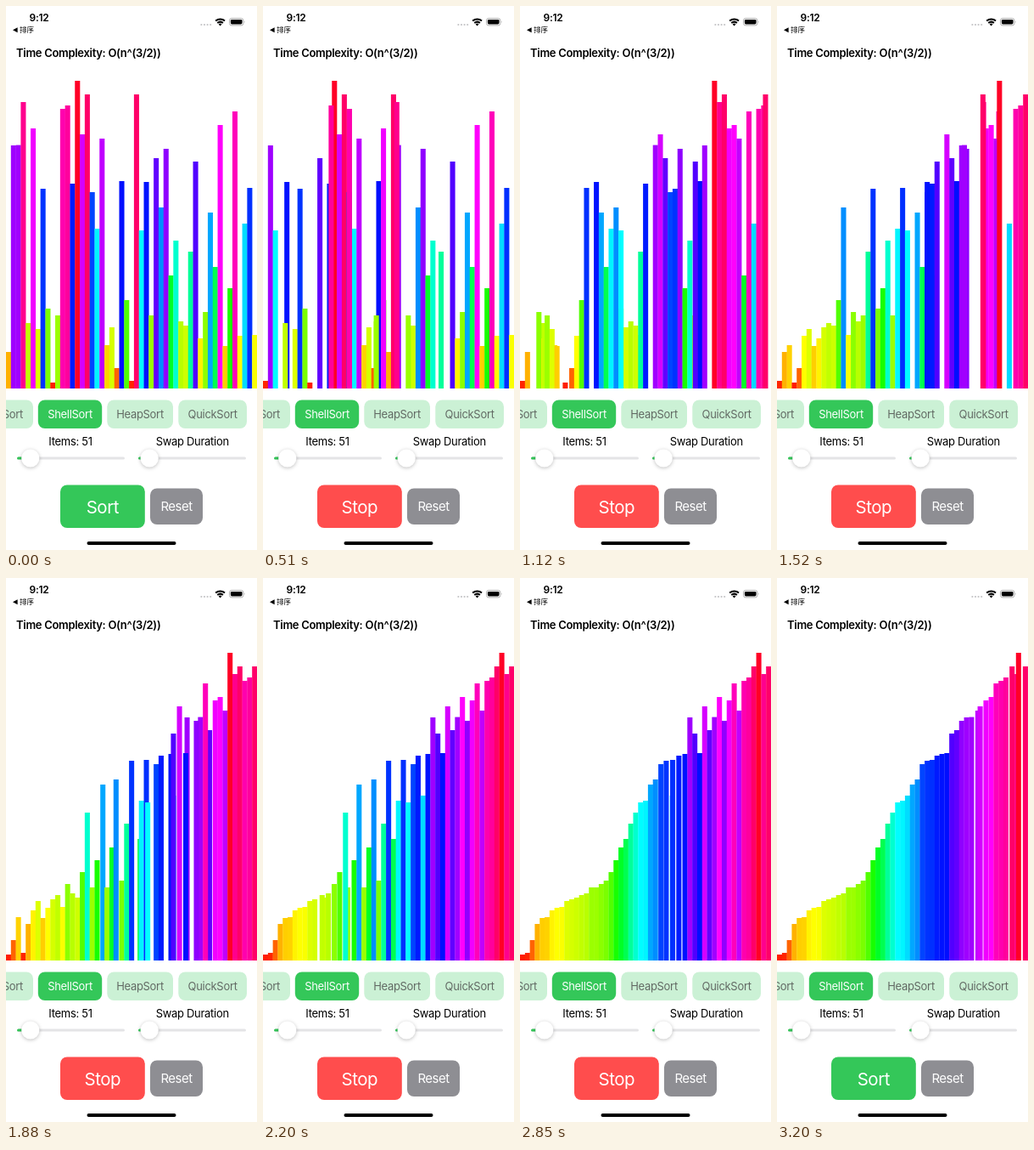
An HTML page for the animation above (3.3 s loop, 296 by 640 pixels).

```html
<!DOCTYPE html>
<html lang="en">
<head>
<meta charset="utf-8">
<title>Shell sort</title>
<style>
  html, body { margin: 0; width: 100%; height: 100%; overflow: hidden; background: #fff; }
  svg { display: block; width: 296px; height: 640px; font: 400 13px Inter, "Noto Sans", sans-serif; letter-spacing: -.3px; font-feature-settings: "calt" 0; }
  .mid { text-anchor: middle; }
  .big { font-size: 20.5px; letter-spacing: -.5px; }
  .reset { font-size: 15px; letter-spacing: -.5px; }
  .back { font: 8.5px "Noto Sans CJK SC", "Noto Sans CJK", sans-serif; letter-spacing: 0; }
  .knob { filter: drop-shadow(0 1.5px 2px rgba(0, 0, 0, .25)); }
</style>
</head>
<body>
<svg viewBox="0 0 296 640">
  <rect width="296" height="640" fill="#fff"/>
  <text x="27.6" y="18" font-size="12" font-weight="600">9:12</text>
  <path d="M8 28.2L13.6 25.2V31.2Z"/>
  <text x="16" y="31.4" class="back" lang="zh-Hans">排序</text>
  <g fill="#c4c4c6">
    <circle cx="230.4" cy="22" r="1.1"/><circle cx="234" cy="22" r="1.1"/>
    <circle cx="237.6" cy="22" r="1.1"/><circle cx="241.2" cy="22" r="1.1"/>
  </g>
  <g fill="none" stroke="#000" stroke-width="2">
    <path d="M247.2 17.6A8 8 0 0 1 258 17.6"/>
    <path d="M249.3 20.1A5 5 0 0 1 255.9 20.1"/>
  </g>
  <path d="M252.6 23.4L250.7 21.5A2.8 2.8 0 0 1 254.5 21.5Z"/>
  <rect x="263.5" y="14.5" width="16.4" height="8.4" rx="2.5" fill="none" stroke="#a8a8a8" stroke-width=".9"/>
  <rect x="264.9" y="15.9" width="13.6" height="5.6" rx="1.4"/>
  <path d="M280.9 17.3Q282.2 18.7 280.9 20.1Z" fill="#a8a8a8"/>
  <text x="12" y="60" font-weight="600">Time Complexity: O(n^(3/2))</text>

  <g id="bars"></g>

  <g fill="#cbf1d5">
    <rect x="-80" y="463.5" width="112" height="33.5" rx="8"/>
    <rect x="119.3" y="463.5" width="77.7" height="33.5" rx="8"/>
    <rect x="203.3" y="463.5" width="80.7" height="33.5" rx="8"/>
  </g>
  <rect x="37.8" y="463.5" width="75.4" height="33.5" rx="8" fill="#34c759"/>
  <g fill="#626a64">
    <text x="20" y="485" text-anchor="end">InsertionSort</text>
    <text x="158" y="485" class="mid">HeapSort</text>
    <text x="243.6" y="485" class="mid">QuickSort</text>
    <text x="75.5" y="485" class="mid" fill="#fff">ShellSort</text>
  </g>

  <text x="76" y="517" class="mid">Items: 51</text>
  <text x="219.7" y="517" class="mid">Swap Duration</text>
  <g fill="#e4e4e6">
    <rect x="13" y="530.6" width="127" height="3" rx="1.5"/>
    <rect x="156" y="530.6" width="127" height="3" rx="1.5"/>
  </g>
  <g fill="#34c759">
    <rect x="13" y="530.6" width="14" height="3" rx="1.5"/>
    <rect x="156" y="530.6" width="12" height="3" rx="1.5"/>
  </g>
  <g fill="#fff" class="knob">
    <circle cx="28.8" cy="532" r="10.6"/>
    <circle cx="169.2" cy="532" r="10.6"/>
  </g>

  <rect id="runBox" x="64" y="563.5" width="99.8" height="50.5" rx="8"/>
  <text id="runText" x="113.8" y="596.5" class="mid big" fill="#fff"></text>
  <rect x="170" y="567.5" width="62" height="42.5" rx="8" fill="#8e8e93"/>
  <text x="201" y="594" class="mid reset" fill="#fff">Reset</text>
  <rect x="95.5" y="630" width="105" height="4" rx="2"/>
</svg>
<script>
const LOOP = 3300, BASE = 450, SLOT = 296 / 51;
const RUN_FROM = 300, RUN_TO = 3200;
const SORT_FROM = 385.5, SWAP_MS = 17.28;   // one swap begins every SWAP_MS
const SPREAD = 0.18;     // share of a move that passes between two swaps

// Heights of the unsorted bars, left to right
const heights = [
  43, 286, 286.4, 337, 77, 306, 70, 235, 94, 7, 86, 329, 333, 241, 362, 299, 346,
  231, 188, 294, 51, 72, 24, 244, 104, 9, 346, 186, 243, 86, 271, 213, 282, 133,
  174, 79, 74, 161, 267, 59, 90, 207, 143, 310, 50, 118, 326, 62, 194, 236, 63
];

// Moments at which the screen refreshes
const ticks = [
  0, 300, 400, 500, 600, 710, 810, 910, 1010, 1120, 1220, 1320, 1420,
  1520, 1640, 1760, 1880, 1980, 2100, 2200, 2310, 2420, 2520, 2620,
  2730, 2840, 2960, 3080, 3200
];

function shellSort(values) {
  const order = values.map((_, i) => i), swaps = [];
  for (let gap = values.length >> 1; gap > 0; gap >>= 1) {
    for (let i = gap; i < order.length; i++) {
      for (let j = i; j >= gap && values[order[j - gap]] > values[order[j]]; j -= gap) {
        const left = order[j - gap], right = order[j];
        swaps.push({ left, right, gap, at: j });
        order[j - gap] = right;
        order[j] = left;
      }
    }
  }
  return swaps;
}

const swaps = shellSort(heights);
const byId = id => document.getElementById(id);
const group = byId("bars"), runBox = byId("runBox"), runText = byId("runText");

const bars = heights.map(h => {
  const bar = document.createElementNS("http://www.w3.org/2000/svg", "rect");
  bar.setAttribute("y", BASE - h);
  bar.setAttribute("width", SLOT + 0.25);   // overlap hides the seams
  bar.setAttribute("height", h);
  bar.setAttribute("fill", `hsl(${h * 0.97}, 100%, 50%)`);
  return bar;
});

function ease(p) {
  p = Math.min(1, Math.max(0, p));
  return p * p * (3 - 2 * p);
}

function draw(t) {
  const due = Math.round((t - SORT_FROM) / SWAP_MS);
  const begun = Math.max(0, Math.min(swaps.length, due));
  const x = heights.map((_, i) => i);
  const order = x.slice();

  // Overlapping moves of one bar add up
  swaps.slice(0, begun).forEach((s, i) => {
    const shift = s.gap * ease(0.14 + SPREAD * (begun - 1 - i));
    x[s.left] += shift;
    x[s.right] -= shift;
    order[s.at] = s.left;
    order[s.at - s.gap] = s.right;
  });

  bars.forEach((bar, i) => bar.setAttribute("x", (x[i] * SLOT).toFixed(2)));
  group.replaceChildren(...order.map(i => bars[i]));

  const running = t >= RUN_FROM && t < RUN_TO;
  runBox.setAttribute("fill", running ? "#ff4d4d" : "#34c759");
  runText.textContent = running ? "Stop" : "Sort";
}

const start = performance.now();
let shown = -1;

function frame() {
  const t = (performance.now() - start) % LOOP;
  const tick = ticks.filter(v => v <= t).pop();
  if (tick !== shown) draw(shown = tick);
  requestAnimationFrame(frame);
}
frame();
</script>
</body>
</html>
```
